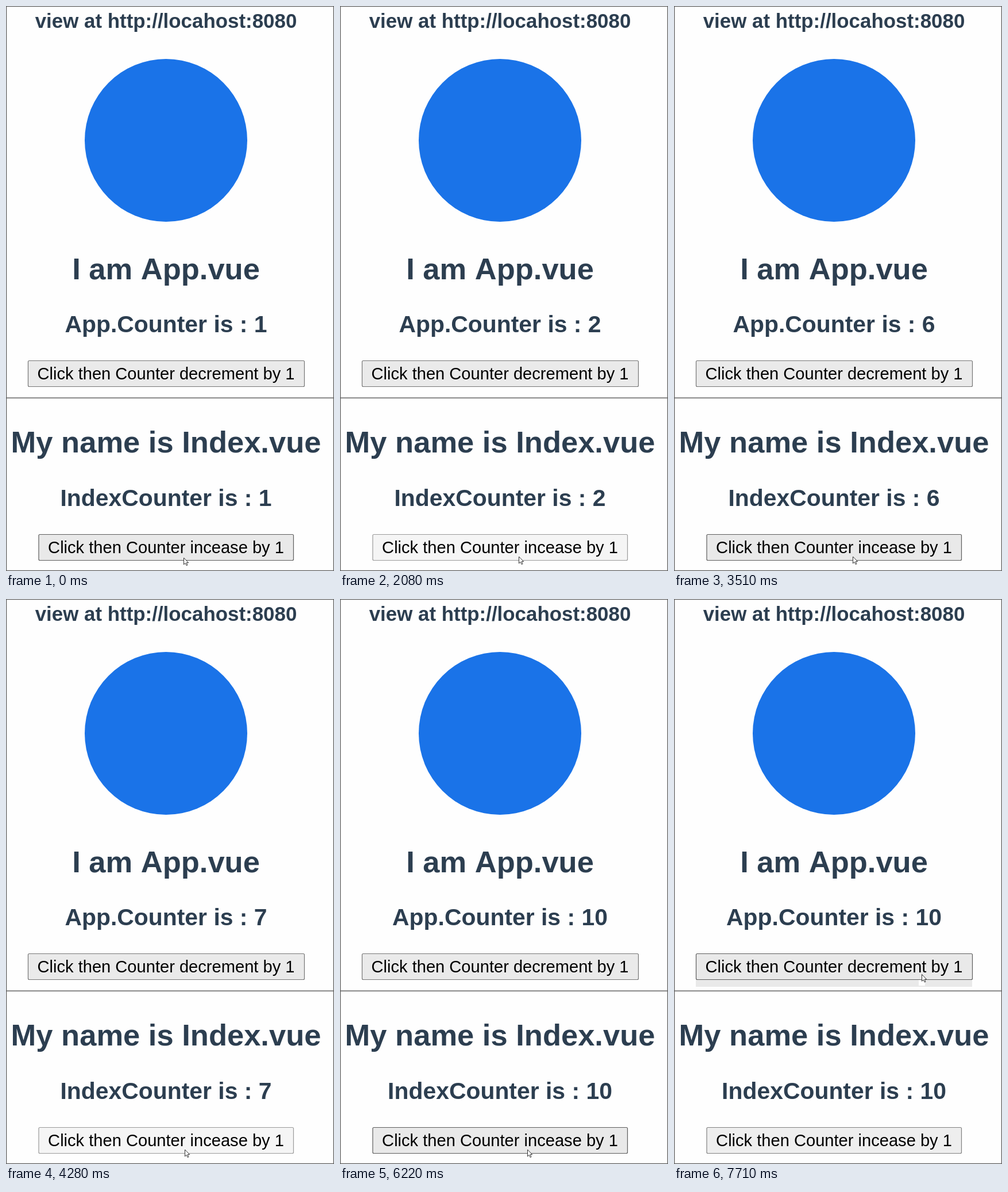
Recreate the animation shown at these times as an HTML page with a canvas. Size 571 px wide and 982 px high, loop 8 s.

```html
<!DOCTYPE html>
<html lang="en">
<head>
<meta charset="utf-8">
<title>Counters</title>
<style>
  html, body { margin: 0; width: 100%; height: 100%; overflow: hidden; background: #fefefe; }
  canvas { display: block; }
</style>
</head>
<body>
<canvas id="stage" width="571" height="982"></canvas>
<script>
const ctx = document.getElementById('stage').getContext('2d');
const LOOP = 8000;
const CENTER = 278.5;
const FONT = '"Liberation Sans", Arial, sans-serif';
const INK = '#2c3e50';

// Each click: [mouse down, mouse up]
const clicks = [
  [1150, 1270], [2080, 2200], [2880, 3000], [3150, 3300], [3420, 3510],
  [3630, 3780], [4280, 4430], [4550, 4670], [4790, 4910]
];

// Pointer stops: [time, x, y]; no position means hidden
const stops = [
  [0, 309, 958.5], [750, 311, 956.5], [6220, 326, 956.5], [6370, 340, 950], [6490],
  [6800, 528, 673], [6920, 500, 668], [7040, 470, 664], [7160, 444, 660],
  [7280, 427, 657], [7430, 429, 652], [7710, 431, 652]
];

const styles = {
  idle:   ['#eaeaea', '#767676'],
  rest:   ['#eeeeee', '#808080'],
  hover:  ['#e9e9e9', '#5c5c5c'],
  active: ['#f5f5f5', '#9a9a9a']
};

function rect(x, y, w, h, color) {
  ctx.fillStyle = color;
  ctx.fillRect(x, y, w, h);
}

function text(str, y, size, color = INK, weight = 'bold') {
  ctx.font = `${weight} ${size}px ${FONT}`;
  ctx.fillStyle = color;
  ctx.fillText(str, CENTER, y);
}

function button(label, x, y, w, state) {
  const [fill, edge] = styles[state];
  ctx.beginPath();
  ctx.roundRect(x + 0.5, y + 0.5, w, 45, 2);
  ctx.fillStyle = fill;
  ctx.fill();
  ctx.strokeStyle = edge;
  ctx.lineWidth = 1.2;
  ctx.stroke();
  text(label, y + 33, 29.1, '#000', 'normal');
}

function pointer(x, y) {
  ctx.save();
  ctx.translate(x, y);
  const shape = new Path2D('M.5 .5V12.3L3.2 9.8L5.2 14L7 13.2L5.1 9.1H8.7Z');
  ctx.fillStyle = '#fff';
  ctx.fill(shape);
  ctx.strokeStyle = '#333';
  ctx.lineWidth = 1;
  ctx.stroke(shape);
  ctx.restore();
}

function draw(t) {
  const count = 1 + clicks.filter(([, up]) => t >= up).length;
  const pressed = clicks.some(([down, up]) => t >= down && t < up);
  const [, px, py] = stops.filter(([at]) => t >= at).pop();

  rect(0, 0, 571, 982, '#fefefe');
  ctx.textAlign = 'center';

  text('view at http://locahost:8080', 38, 34.9);
  ctx.beginPath();
  ctx.arc(CENTER, 233.5, 141.5, 0, Math.PI * 2);
  ctx.fillStyle = '#1a73e8';
  ctx.fill();

  text('I am App.vue', 475, 52.5);
  text(`App.Counter is : ${count}`, 567, 40.9);
  if (t >= 7160) rect(38, 662, 481, 12, '#e9e9e9');
  if (t >= 7430) rect(426, 662, 11, 10, '#fefefe');
  button('Click then Counter decrement by 1', 38, 616, 481, t >= 7160 ? 'hover' : 'idle');

  rect(0, 680, 571, 2, '#959595');
  rect(0, 682, 571, 1, '#dcdcdc');

  text('My name is Index.vue', 776, 52.5);
  text(`IndexCounter is : ${count}`, 869, 40.9);
  const state = pressed ? 'active' : t < 6490 ? 'hover' : 'rest';
  button('Click then Counter incease by 1', 56.5, 918, 443.5, state);

  ctx.strokeStyle = '#666';
  ctx.lineWidth = 1.4;
  ctx.strokeRect(0.6, 0.6, 569.8, 980.8);

  if (px !== undefined) pointer(px, py);
}

const start = performance.now();
function tick() {
  draw((performance.now() - start) % LOOP);
  requestAnimationFrame(tick);
}
tick();
</script>
</body>
</html>
```
